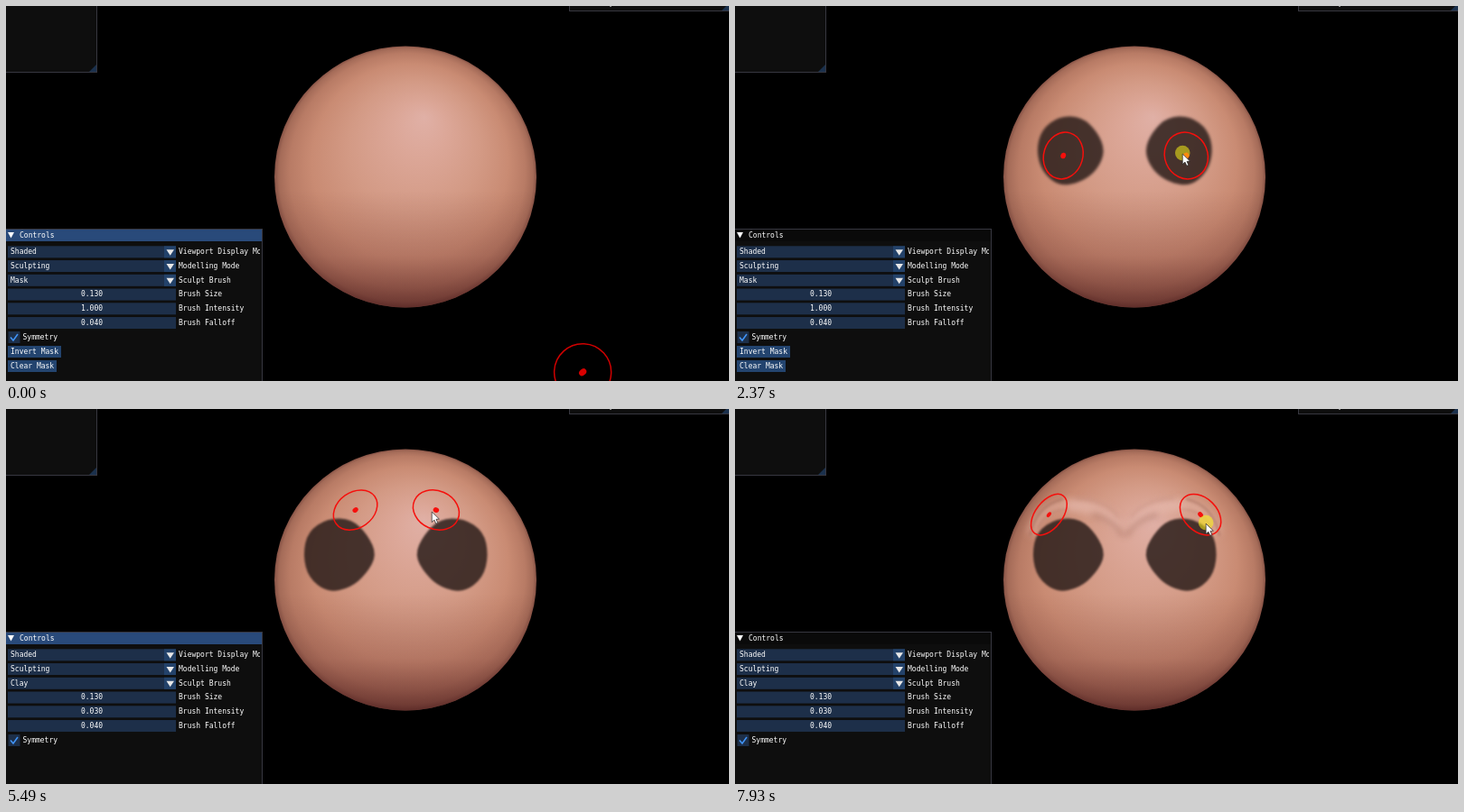
Animation of 800 by 416 pixels, one loop 8000 ms. Source, as an HTML page with a canvas:

```html
<!DOCTYPE html>
<html lang="en">
<head>
<meta charset="utf-8">
<title>Sculpting</title>
<style>
  html, body { margin: 0; width: 100%; height: 100%; overflow: hidden; background: #000; }
  canvas { display: block; width: 800px; height: 416px; }
</style>
</head>
<body>
<canvas id="stage" width="800" height="416"></canvas>
<script>
const ctx = document.getElementById('stage').getContext('2d');
const LOOP = 8000;
const BALL = { x: 442, y: 189.5, r: 145 };
const MIRROR = 862.5;          // x + mirrored x
const RING_LAG = 70;           // the brush ring trails the pointer
const POPUP = { open: 4290, close: 4800 };

// Pointer path: time, x, y
const TRAVEL = [
  [-70, 638, 406], [0, 648, 422], [200, 722, 370], [500, 610, 240], [860, 490, 138]];
const MASKING = [
  [1200, 492, 160], [1500, 496, 148], [1760, 477, 159], [1830, 483, 152],
  [2150, 508, 170], [2600, 482, 158], [2900, 500, 178], [2970, 492, 177], [3150, 511, 165]];
const MENU = [
  [3450, 470, 185], [3700, 290, 317], [4130, 180, 304], [4290, 178, 304],
  [4800, 60, 320], [5080, 200, 292], [5320, 490, 130]];
const CLAY = [
  [5420, 476, 112], [5490, 471, 114], [5700, 511, 122], [5980, 464, 120], [6500, 531, 135],
  [6980, 470, 121], [7050, 462, 127], [7500, 522, 128], [7700, 480, 114], [7860, 515, 117],
  [7930, 521, 127], [8000, 528, 136]];
const PATH = [...TRAVEL, ...MASKING, ...MENU, ...CLAY];

// The right-hand mask: radii around its middle at even angles, clockwise from the right
const EARLY = { x: 487, y: 158, radii: [33, 33, 37, 34, 37, 33, 33, 35, 36, 33] };
const FULL = { x: 493, y: 162, radii: [41, 43, 44, 38, 36, 41, 38, 42, 43, 44] };

const clamp = v => Math.max(0, Math.min(1, v));
const ramp = (t, from, to) => clamp((t - from) / (to - from));
const mix = (a, b, k) => a + (b - a) * k;
const within = (t, from, to) => t >= from && t < to;

function pointer(t) {
  let i = 1;
  while (i < PATH.length - 1 && PATH[i][0] < t) i++;
  const [t0, x0, y0] = PATH[i - 1], [t1, x1, y1] = PATH[i];
  const k = ramp(t, t0, t1);
  return { x: mix(x0, x1, k), y: mix(y0, y1, k) };
}

function rect(x, y, w, h, color) {
  ctx.fillStyle = color;
  ctx.fillRect(x, y, w, h);
}

function polygon(points, color) {
  ctx.beginPath();
  points.forEach(p => ctx.lineTo(...p));
  ctx.closePath();
  ctx.fillStyle = color;
  ctx.fill();
}

function disc(x, y, r, color) {
  ctx.beginPath();
  ctx.arc(x, y, r, 0, 7);
  ctx.fillStyle = color;
  ctx.fill();
}

function label(str, x, y, align = 'left') {
  ctx.font = '8px "DejaVu Sans Mono", monospace';
  ctx.textBaseline = 'middle';
  ctx.textAlign = align;
  ctx.fillStyle = '#fff';
  ctx.fillText(str, x, y);
}

function bothSides(draw) {
  draw();
  ctx.save();
  ctx.translate(MIRROR, 0);
  ctx.scale(-1, 1);
  draw();
  ctx.restore();
}

function gradient(g, stops) {
  stops.forEach(([at, color]) => g.addColorStop(at, color));
  return g;
}

const SKIN = gradient(ctx.createRadialGradient(463, 123, 0, BALL.x, BALL.y, BALL.r), [
  [0, '#e0b0a6'], [.2, '#dca798'], [.5, '#d39a85'], [.75, '#c98b73'],
  [.9, '#b87b65'], [.97, '#a46b58'], [1, '#875346']]);
const SHADE = gradient(ctx.createLinearGradient(0, 205, 0, 335), [
  [0, 'rgba(100,40,35,0)'], [.55, 'rgba(100,40,38,.22)'], [1, 'rgba(70,22,24,.62)']]);

function curve(d, width, color, blur, alpha) {
  ctx.globalAlpha = alpha;
  ctx.filter = `blur(${blur}px)`;
  ctx.lineWidth = width;
  ctx.lineCap = 'round';
  ctx.strokeStyle = color;
  ctx.stroke(new Path2D(d));
  ctx.filter = 'none';
  ctx.globalAlpha = 1;
}

function drawBrow(t) {
  const first = ramp(t, 6050, 6700), second = ramp(t, 6950, 7900);
  if (!first) return;
  bothSides(() => {
    curve('M470 112Q518 94 533 135', 11, '#e3b5a6', 4, first * .55);
    curve('M500 100Q529 107 536 140', 2, '#8f5d4c', 1.5, first * .5);
    curve('M494 111Q520 113 527 132', 2, '#a36c59', 1.5, first * .3);
    if (!second) return;
    curve('M440 128Q458 103 490 107', 12, '#e4b8ac', 4, second * .6);
    curve('M434 140Q445 122 466 118', 4, '#a06a5a', 3, second * .5);
    curve('M438 120Q452 101 485 99', 2, '#a8705f', 2, second * .35);
  });
}

function drawMask(t) {
  if (t < 1000) return;
  const start = mix(.72, 1, ramp(t, 1000, 1600));
  const grow = ramp(t, 1850, 2650);
  const cx = mix(EARLY.x, FULL.x, grow), cy = mix(EARLY.y, FULL.y, grow);
  const count = FULL.radii.length;
  const corner = i => {
    const r = mix(EARLY.radii[i % count] * start, FULL.radii[i % count], grow);
    const angle = i / count * Math.PI * 2;
    return [cx + r * Math.cos(angle), cy + r * Math.sin(angle)];
  };
  bothSides(() => {
    ctx.beginPath();
    for (let i = 0; i <= count; i++) {
      const [x, y] = corner(i), [nx, ny] = corner(i + 1);
      const mx = (x + nx) / 2, my = (y + ny) / 2;
      i ? ctx.quadraticCurveTo(x, y, mx, my) : ctx.moveTo(mx, my);
    }
    ctx.filter = `blur(${mix(2, 1.2, grow)}px)`;
    ctx.fillStyle = 'rgba(46,32,29,.86)';
    ctx.fill();
    ctx.filter = 'none';
  });
}

function drawBall(t) {
  ctx.save();
  disc(BALL.x, BALL.y, BALL.r, SKIN);
  disc(BALL.x, BALL.y, BALL.r, SHADE);
  ctx.clip();
  drawBrow(t);
  drawMask(t);
  ctx.restore();
}

// A circle lying on the ball is foreshortened along its radial direction.
function drawRing(x, y, mirrored) {
  const dx = (x - BALL.x) / BALL.r, dy = (y - BALL.y) / BALL.r;
  const d2 = dx * dx + dy * dy, onBall = d2 < 1;
  if (mirrored && !onBall) return;
  const r = onBall ? 26.2 : 31.5;
  const squash = onBall ? Math.sqrt(1 - d2) : 1;
  ctx.save();
  ctx.translate(x, y);
  ctx.rotate(Math.atan2(dy, dx));
  ctx.beginPath();
  ctx.ellipse(0, 0, r * squash, r, 0, 0, 7);
  ctx.strokeStyle = onBall ? '#f60f0c' : '#d00000';
  ctx.lineWidth = 1.5;
  ctx.stroke();
  ctx.beginPath();
  ctx.ellipse(0, 0, 3.5 * squash, onBall ? 3.3 : 4.5, 0, 0, 7);
  ctx.fillStyle = onBall ? '#f60f0c' : '#d80000';
  ctx.fill();
  ctx.restore();
  if (!mirrored && onBall) drawRing(MIRROR - x, y, true);
}

function panel(x, y, w, h) {
  rect(x, y, w, h, '#0e0e0e');
  ctx.strokeStyle = '#373740';
  ctx.lineWidth = 1;
  ctx.strokeRect(x + .5, y + .5, w - 1, h - 1);
}

function grip(x, y) {
  polygon([[x, y], [x, y - 8], [x - 8, y]], '#1b314d');
}

function combo(y, value, mouse) {
  const hover = mouse && within(mouse.x, 2, 188) && within(mouse.y, y, y + 13);
  rect(2, y, 186, 13, hover ? '#23446d' : '#1d2f49');
  rect(175, y, 13, 13, hover ? '#4296fa' : '#23426a');
  polygon([[177.5, y + 4], [186, y + 4], [181.7, y + 10.5]], '#e8e8e8');
  label(value, 5, y + 6.8);
}

function drawControls(t, mouse) {
  const clay = t >= POPUP.close;
  const focused = t < 980 || within(t, POPUP.open, 5990);
  const popup = within(t, POPUP.open, POPUP.close);
  const rowY = i => 266.3 + i * 15.75;

  panel(-1, 247, 285, 180);
  rect(0, 248, 283, 13, focused ? '#294a7a' : '#0a0a0a');
  polygon([[2, 251], [9, 251], [5.5, 257.5]], '#fff');
  label('Controls', 15, 254.5);

  ctx.save();
  ctx.beginPath();
  ctx.rect(0, 262, 281, 154);
  ctx.clip();
  ['Shaded', 'Sculpting', clay ? 'Clay' : 'Mask'].forEach((v, i) => combo(rowY(i), v, popup ? null : mouse));
  ['0.130', clay ? '0.030' : '1.000', '0.040'].forEach((v, i) => {
    rect(2, rowY(i + 3), 186, 13, '#1d2f49');
    label(v, 95, rowY(i + 3) + 6.8, 'center');
  });
  ['Viewport Display Mode', 'Modelling Mode', 'Sculpt Brush', 'Brush Size', 'Brush Intensity', 'Brush Falloff']
    .forEach((name, i) => label(name, 191, rowY(i) + 6.8));

  rect(2.5, 361, 13, 13, '#1d2f49');
  ctx.beginPath();
  ctx.moveTo(5, 367.5);
  ctx.lineTo(8, 371);
  ctx.lineTo(13, 364);
  ctx.strokeStyle = '#4296fa';
  ctx.lineWidth = 1.5;
  ctx.stroke();
  label('Symmetry', 18.5, 368);

  if (!clay) {
    rect(2, 377, 59, 13, '#23446f');
    label('Invert Mask', 5, 383.8);
    rect(2, 393, 54, 13, '#23446f');
    label('Clear Mask', 5, 399.8);
  }
  if (popup) {
    panel(2, 311, 186, 78);
    ['Clay', 'Draw', 'Grab', 'Smooth', 'Mask'].forEach((name, i) => {
      const y = 313 + i * 15;
      if (within(mouse.y, y, y + 15)) rect(3, y, 184, 14, '#2d62a4');
      label(name, 6, y + 7);
    });
  }
  ctx.restore();
}

function drawPointer({ x, y }, pressed) {
  if (pressed) disc(x, y - 1, 8.3, 'rgba(255,250,20,.52)');
  ctx.save();
  ctx.translate(x, y);
  polygon([[0, 0], [0, 11.5], [2.7, 9], [4.6, 13.2], [6.6, 12.3], [4.8, 8.3], [8.2, 8]], '#fff');
  ctx.strokeStyle = '#222';
  ctx.lineWidth = .7;
  ctx.stroke();
  ctx.restore();
}

function draw(t) {
  const mouse = pointer(t), brush = pointer(t - RING_LAG);
  const overControls = p => p.x < 284 && p.y > 247;
  rect(0, 0, 800, 416, '#000');
  drawBall(t);
  if (!overControls(mouse) && !overControls(brush)) drawRing(brush.x, brush.y);

  panel(-1, -1, 102, 75);
  grip(100, 73);
  panel(623, -10, 178, 16);
  grip(800, 5);
  rect(668, 0, 2, 1, '#888');
  drawControls(t, mouse);

  drawPointer(mouse, within(t, 1000, 3350) || t >= 6000);
}

function tick(now) {
  draw(now % LOOP);
  requestAnimationFrame(tick);
}
draw(0);
requestAnimationFrame(tick);
</script>
</body>
</html>
```
